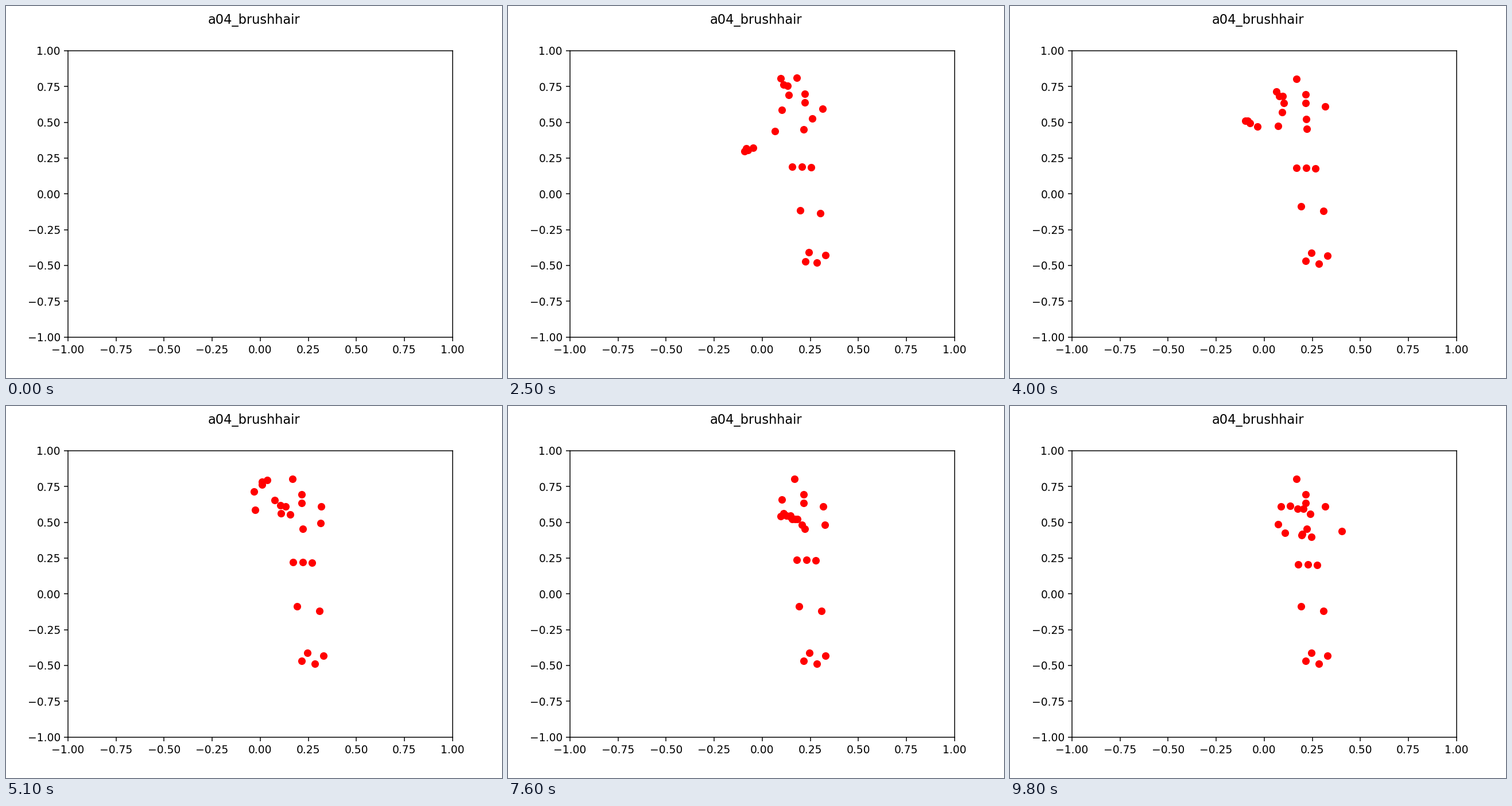
A matplotlib script for the animation above (9.9 s loop, 864 by 648 pixels).

```python
import numpy as np
import matplotlib.pyplot as plt
from matplotlib.animation import FuncAnimation

FRAMES = 99
INTERVAL = 100
W, H, DPI = 864, 648, 135

# All positions are in stage pixels, y pointing down.
# Steady joints shift once, from the first stance to the second.
STANCE = dict(
    head=[(507, 123), (499, 127)],
    neck=[(518, 152), (515, 154)],
    right_shoulder=[(547, 183), (549, 175)],
    spine=[(513, 215), (517, 214)],
    left_knee=[(510, 363), (507, 349)],
    right_knee=[(543, 364), (546, 357)],
    left_ankle=[(523, 429), (525, 430)],
    right_ankle=[(553, 434), (553, 435)],
    left_foot=[(521, 446), (515, 444)],
    right_foot=[(538, 446), (538, 449)],
)

# Moving joints pass through one point per key frame.
KEYS = [11, 25, 40, 51, 76, 98]
MOVES = dict(
    pelvis=[(508, 278), (512, 280), (516, 282), (517, 272), (520, 268), (519, 276)],
    left_shoulder=[(477, 175), (477, 181), (474, 185), (479, 187), (477, 163), (472, 175)],
    left_elbow=[(470, 222), (465, 218), (467, 209), (434, 181), (475, 192), (467, 206)],
    left_wrist=[(460, 271), (427, 247), (431, 210), (432, 149), (480, 187), (479, 221)],
    left_tip=[(456, 306), (412, 253), (410, 200), (455, 129), (500, 197), (525, 228)],
    right_elbow=[(559, 237), (530, 196), (516, 197), (548, 204), (552, 207), (578, 218)],
    right_wrist=[(545, 291), (489, 155), (477, 169), (495, 189), (512, 207), (523, 188)],
    right_tip=[(523, 316), (475, 126), (464, 149), (468, 164), (485, 191), (488, 174)],
)


def mix(a, b, u):
    return a + (b - a) * u


def bump(n, start, end):
    """Rise from 0 to 1 and back between two frames."""
    return np.sin(np.pi * np.clip((n - start) / (end - start), 0, 1)) ** 2


def stand(n):
    u = np.clip((n - 11) / 29, 0, 1)
    u = u * u * (3 - 2 * u)
    return {name: mix(*np.array(ends, float), u) for name, ends in STANCE.items()}


def move(n):
    return {name: np.array([np.interp(n, KEYS, axis) for axis in zip(*points)])
            for name, points in MOVES.items()}


def pose(n):
    """Positions of the 25 joints at frame n."""
    j = stand(n) | move(n)

    # Elbows swing outwards between brush strokes.
    j["right_elbow"][0] += 28 * bump(n, 11, 25) + 22 * bump(n, 51, 76)
    j["left_elbow"][0] -= 23 * bump(n, 76, 98)
    j["left_tip"][1] -= 30 * bump(n, 51, 61)

    j["chest"] = j["neck"] + (0, 15.5)
    j["left_hip"] = j["pelvis"] + (-17.5, 0)
    j["right_hip"] = j["pelvis"] + (16, 1)
    for side, along, spread in (("left", 0.7, (-2, -3)), ("right", 0.45, (4, -3))):
        wrist, tip = j[side + "_wrist"], j[side + "_tip"]
        j[side + "_hand"] = mix(wrist, tip, 0.62)
        j[side + "_thumb"] = mix(wrist, tip, along) + spread

    # The whole figure settles upwards a little at the start.
    settle = 3 * max(0, 1 - n / 11)
    return np.array(list(j.values())) + (0, settle)


fig, ax = plt.subplots(figsize=(W / DPI, H / DPI), dpi=DPI)
fig.suptitle("a04_brushhair")
ax.set_xlim(-1, 1)
ax.set_ylim(-1, 1)
dots, = ax.plot([], [], "ro")

box = ax.get_position()
center = np.array([(box.x0 + box.x1) * W, (2 - box.y0 - box.y1) * H]) / 2
half = np.array([box.width * W, -box.height * H]) / 2


def draw(n):
    # The loop opens on empty axes.
    points = (pose(n) - center) / half if n else np.empty((0, 2))
    dots.set_data(points[:, 0], points[:, 1])
    return dots,


anim = FuncAnimation(fig, draw, frames=FRAMES, interval=INTERVAL,
                     repeat=True, repeat_delay=0)
plt.show()
```
